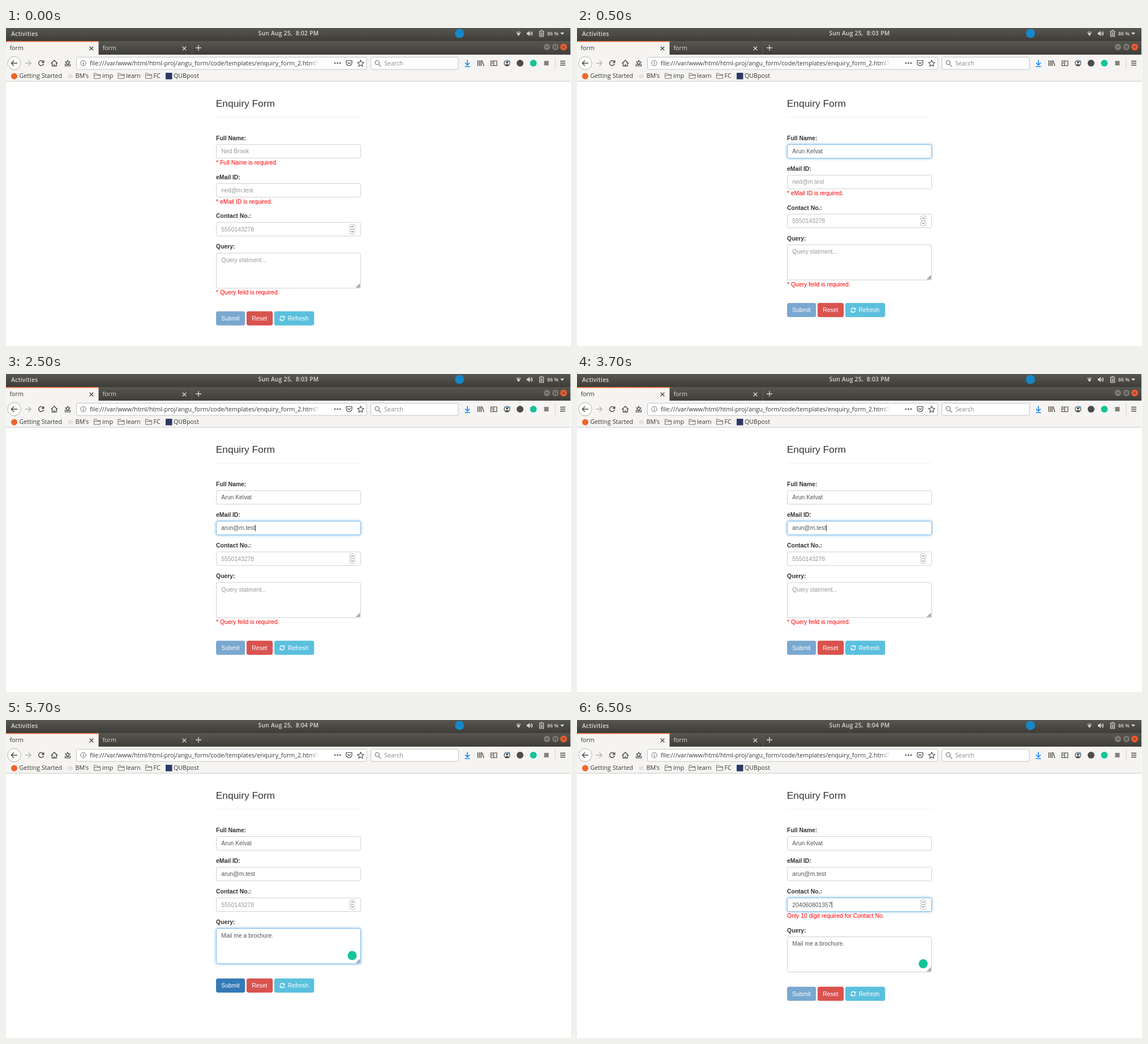
Write an HTML page that moves like this. It is 998 px wide and 561 px high and loops after 8 s.

```html
<!DOCTYPE html>
<html lang="en">
<head>
<meta charset="utf-8">
<title>Enquiry Form</title>
<style>
  html, body { margin: 0; width: 100%; height: 100%; overflow: hidden; background: #fff; }
  svg { display: block; width: 100%; height: 100%; }
  text { white-space: pre; }
  .ui { font: 10.7px "Open Sans", "Noto Sans", sans-serif; fill: #3a3935; }
  .bar { font: 600 10.2px "Open Sans", "Noto Sans", sans-serif; letter-spacing: .3px; fill: #dfdbd2; }
  .line { fill: none; stroke: #4a4945; stroke-width: 1.4; }
  .light { fill: none; stroke: #dfdbd2; stroke-width: 1.3; }
  .box { fill: #fff; stroke: #c6c4c1; }
  #form { font: 10.4px "Liberation Sans", Arial, sans-serif; }
  .label { font-weight: bold; fill: #333; }
  .value { fill: #555; }
  .hint { fill: #999; }
  .error { fill: #f00; }
  .input { fill: #fff; stroke: #c4c4c4; }
  .focus { stroke: #66afe9; filter: drop-shadow(0 0 2.4px rgba(102, 175, 233, .85)); }
  .btn { fill: #fff; }
</style>
</head>
<body>
<svg viewBox="0 0 998 561">
  <defs>
    <linearGradient id="dark" x2="0" y2="1">
      <stop stop-color="#57564f"/><stop offset="1" stop-color="#3d3c38"/>
    </linearGradient>
    <linearGradient id="fade">
      <stop stop-color="#fff" stop-opacity="0"/><stop offset="1" stop-color="#fff"/>
    </linearGradient>
    <path id="folder" d="M.5 9.5V.5H4.5L6 2.5H11.5V9.5ZM.5 4H11.5" fill="none" stroke="#75736f"/>
    <path id="cross" d="M-3.3 -3.3L3.3 3.3M3.3 -3.3L-3.3 3.3"/>
    <g id="arrows">
      <path d="M-3.7 -.9A3.8 3.8 0 0 1 2.9 -2.5" fill="none" stroke="#fff" stroke-width="1.5"/>
      <path d="M4.5 -4.5V-.7H.7Z" fill="#fff"/>
    </g>
  </defs>

  <!-- desktop bar -->
  <rect width="997" height="23.5" fill="url(#dark)"/>
  <text class="bar" x="9" y="13.6">Activities</text>
  <text class="bar" id="clock" x="445.5" y="13.4"></text>
  <circle cx="801" cy="9.5" r="8" fill="#1688c9"/>
  <path d="M900.5 7.5Q905.3 3.6 910 7.5L905.3 14Z" fill="#8b8881"/>
  <path d="M902.5 10Q905.3 7.8 908 10L905.3 14Z" fill="#dfdbd2"/>
  <path d="M920 8H922L925 5V14.5L922 11.5H920Z" fill="#dfdbd2"/>
  <path class="light" d="M926.5 7.5Q928 9.7 926.5 12M928.3 6Q930.7 9.7 928.3 13.5"/>
  <path class="light" d="M942.5 5.5H949.5V15H942.5ZM944.5 4H947.5M944 8.5H948M944 10.5H948M944 12.7H948" style="stroke-width:1.2"/>
  <text class="bar" x="956" y="13" style="font-size:8.8px;letter-spacing:0">86 %</text>
  <path d="M979 8H986L982.5 12Z" fill="#dfdbd2"/>

  <!-- tabs -->
  <rect y="23" width="997" height="25" fill="url(#dark)"/>
  <rect y="23" width="163.5" height="25" fill="#f5f4f2"/>
  <rect y="23" width="163.5" height="1.7" fill="#ee7f4b"/>
  <rect x="328" y="24" width="1" height="23" fill="#5d5b55"/>
  <text class="ui" x="6.5" y="39">form</text>
  <text class="ui" x="170.5" y="39" style="fill:#dfdbd2">form</text>
  <use href="#cross" x="151" y="36" class="line"/>
  <use href="#cross" x="315" y="36" class="light"/>
  <path class="light" d="M335 35H345M340 30V40"/>
  <circle cx="955.5" cy="33.5" r="5.7" fill="#7b7973"/>
  <circle cx="970.5" cy="33.5" r="5.7" fill="#7b7973"/>
  <circle cx="985" cy="33.5" r="6" fill="#ec5b2d"/>
  <path d="M953 33.5H958M968.5 31.7H972.5V35.5H968.5ZM983 31.5L987 35.5M987 31.5L983 35.5" fill="none" stroke="#3c3b37"/>

  <!-- toolbar -->
  <rect y="47" width="997" height="47" fill="#f5f4f2"/>
  <rect y="93.5" width="997" height="1" fill="#cccac7"/>
  <circle cx="14.5" cy="62" r="11.7" class="box" style="stroke:#b3b1ad"/>
  <path class="line" d="M20 62H9.5M14 57.3L9.3 62L14 66.7"/>
  <path class="line" d="M33.5 62H44M39.5 57.3L44.2 62L39.5 66.7" style="stroke:#b7b5b1"/>
  <path class="line" d="M65.5 59A4.4 4.4 0 1 0 66.4 63"/>
  <path d="M67.5 56.5V61.5H62.5Z" fill="#4a4945"/>
  <path class="line" d="M79.5 62.5L85.3 57L91 62.5M81.5 61.5V67H89V61.5M85.3 67V63.5"/>
  <path class="line" d="M104.5 63V66.8H113.5V63M106.5 64.5H111.5M109 57L110.3 59.6L113 60L111 61.8L111.3 63.5H106.7L107 61.8L105 60L107.7 59.6Z" style="stroke-width:1.2"/>
  <rect class="box" x="124.5" y="51.5" width="512.5" height="21.5" rx="2"/>
  <circle cx="136.5" cy="62" r="4.7" class="line" style="stroke:#75736f;stroke-width:1"/>
  <path d="M136.5 61V65M136.5 59V60" stroke="#75736f" stroke-width="1.2"/>
  <text class="ui" x="148" y="66">file:///var/www/html/html-proj/angu_form/code/templates/enquiry_form_2.html?</text>
  <rect x="535" y="54" width="19" height="17" fill="url(#fade)"/>
  <rect x="554" y="54" width="15" height="17" fill="#fff"/>
  <g fill="#5b5955"><circle cx="581" cy="62" r="1.4"/><circle cx="585.5" cy="62" r="1.4"/><circle cx="590" cy="62" r="1.4"/></g>
  <path class="line" d="M601 57.5H611V61.5A5 5 0 0 1 601 61.5ZM603.3 60.5L606 63L608.7 60.5" style="stroke-width:1.2"/>
  <path class="line" d="M626.5 56.7L628.2 60.3L632 60.8L629.2 63.5L629.9 67.4L626.5 65.5L623.1 67.4L623.8 63.5L621 60.8L624.8 60.3Z" style="stroke-width:1.1"/>
  <rect class="box" x="644.5" y="51.5" width="154.5" height="21.5" rx="2"/>
  <path class="line" d="M658.5 64.5L662.5 68M659.3 61A3.6 3.6 0 1 1 652.1 61A3.6 3.6 0 1 1 659.3 61" style="stroke:#85837f"/>
  <text class="ui" x="668" y="66" style="fill:#8a8884">Search</text>
  <path class="line" d="M815 56.5V65M811 61.5L815 65.3L819 61.5M810.5 68H819.5" style="stroke:#0a84ff;stroke-width:1.6"/>
  <path class="line" d="M833.5 57V67M836.5 57V67M839.3 57V67M841 57.5L844 67"/>
  <path class="line" d="M856.5 58H867V66.5H856.5ZM861.5 58V66.5M858 60.5H860M858 62.5H860" style="stroke-width:1.2"/>
  <circle cx="885" cy="62" r="5" class="line" style="stroke-width:1.2"/>
  <circle cx="885" cy="60.5" r="2" fill="#4a4945"/>
  <path d="M881.5 65.5Q885 61.5 888.5 65.5Q885 68 881.5 65.5Z" fill="#4a4945"/>
  <circle cx="888.5" cy="58.5" r="1.8" fill="#3a9be8"/>
  <circle cx="908" cy="62" r="6" fill="#4d4c4a"/>
  <circle cx="931.5" cy="62" r="6" fill="#15c39a"/>
  <rect x="950.5" y="58" width="8" height="8" fill="#85837f"/>
  <rect x="969.5" y="51" width="1" height="22" fill="#d4d2cf"/>
  <path class="line" d="M979 58.5H988M979 62H988M979 65.5H988"/>

  <!-- bookmarks -->
  <circle cx="14.5" cy="85" r="5.5" fill="#f0652a"/>
  <text class="ui" x="23.5" y="88.3">Getting Started</text>
  <ellipse cx="113.5" cy="85" rx="4.5" ry="3.5" fill="#e3e1df"/>
  <text class="ui" x="122.5" y="88.3">BM's</text>
  <use href="#folder" x="155" y="79.5"/>
  <text class="ui" x="170" y="88.3">imp</text>
  <use href="#folder" x="197.5" y="79.5"/>
  <text class="ui" x="212" y="88.3">learn</text>
  <use href="#folder" x="246" y="79.5"/>
  <text class="ui" x="260.5" y="88.3">FC</text>
  <rect x="282" y="79" width="11.5" height="11.5" fill="#2c3a62"/>
  <text class="ui" x="296" y="88.3">QUBpost</text>

  <g id="form"></g>
</svg>
<script>
const LEFT = 371.1, WIDTH = 255.7, EDGE = .8, LOOP = 8000;
const NAME = "Arun Kelvat", MAIL = "arun@m.test", QUERY = "Mail me a brochure.";
const FIELDS = [
  { key: "name", label: "Full Name:", hint: "Ned Brook", error: "* Full Name is required." },
  { key: "mail", label: "eMail ID:", hint: "ned@m.test", error: "* eMail ID is required." },
  { key: "phone", label: "Contact No.:", hint: "5550143278" },
  { key: "query", label: "Query:", hint: "Query statment...", error: "* Query feild is required.", tall: true }
];
const STATES = [
  { start: 0, clock: "8:02" },
  { start: 500, clock: "8:03", name: NAME, focus: "name" },
  { start: 2500, clock: "8:03", name: NAME, mail: MAIL, focus: "mail", caret: true },
  { start: 4500, clock: "8:04", name: NAME, mail: MAIL, query: QUERY, focus: "query", valid: true },
  { start: 6500, clock: "8:04", name: NAME, mail: MAIL, query: QUERY, phone: "204060801357",
    focus: "phone", caret: true, phoneError: "Only 10 digit required for Contact No." }
];
const form = document.getElementById("form"), clock = document.getElementById("clock");

const text = (x, y, cls, str) => `<text x="${x}" y="${y}" class="${cls}">${str}</text>`;
const box = (x, y, w, h, attrs) =>
  `<rect x="${x + EDGE / 2}" y="${y + EDGE / 2}" width="${w - EDGE}" height="${h - EDGE}" rx="2.6" stroke-width="${EDGE}" ${attrs}/>`;
const path = (d, attrs) => `<path d="${d}" ${attrs}/>`;

function spinner(y) {
  const frame = 'fill="#fff" stroke="#aaa"';
  return box(606.7, y + 3.2, 9.8, 9, frame) + box(606.7, y + 12.2, 9.8, 9, frame) +
    path(`M609.6 ${y + 8.7}l2 -2l2 2M609.6 ${y + 15.5}l2 2l2 -2`, 'fill="none" stroke="#333"');
}

function button(x, y, w, label, textX, fill, edge, opacity = 1) {
  return `<g opacity="${opacity}">` + box(x, y, w, 24.8, `fill="${fill}" stroke="${edge}"`) +
    text(textX, y + 16.1, "btn", label) + "</g>";
}

function render(s) {
  clock.textContent = `Sun Aug 25,\u00a0 ${s.clock} PM`;
  let y = 205.3;
  let out = `<text x="${LEFT - .4}" y="139" fill="#333" font-size="17.4">Enquiry Form</text>` +
    `<rect x="${LEFT}" y="157" width="${WIDTH}" height=".8" fill="#eee"/>`;
  for (const f of FIELDS) {
    const value = s[f.key], focused = s.focus === f.key, h = f.tall ? 62.8 : 24.8;
    const error = f.key === "phone" ? s.phoneError : !value && f.error;
    out += text(LEFT, y - 7.3, "label", f.label) +
      box(LEFT, y, WIDTH, h, `class="input ${focused ? "focus" : ""}"`) +
      text(380.3, y + 16.1, value ? "value" : "hint", value || f.hint);
    if (f.key === "phone") out += spinner(y);
    if (f.tall) {
      out += path(`M625.3 ${y + 53.5}V${y + 61.3}H617.3Z`, 'fill="#aaa"');
      if (value) out += `<circle cx="611.5" cy="${y + 48}" r="8" fill="#15c39a"/>`;
    }
    if (focused && s.caret) out += `<rect id="caret" y="${y + 6.5}" width="1" height="11.5" fill="#333"/>`;
    y += h;
    if (error) {
      out += text(LEFT, y + 11, "error", error);
      y += 14.6;
    }
    y += f.tall ? 25.7 : 29.26;
  }
  out += button(LEFT, y, 51.1, "Submit", 380.3, "#337ab7", "#2e6da4", s.valid ? 1 : .65) +
    button(425, y, 46.1, "Reset", 434.2, "#d9534f", "#d43f3a") +
    button(474, y, 70.2, "Refresh", 497.8, "#5bc0de", "#46b8da") +
    `<g transform="translate(487.9 ${y + 12.5})"><use href="#arrows"/><use href="#arrows" transform="rotate(180)"/></g>`;
  form.innerHTML = out;
  const caret = document.getElementById("caret");
  if (caret) caret.setAttribute("x", 380.3 + form.querySelector(".focus + text").getComputedTextLength());
}

let shown;
const began = performance.now();
function tick() {
  const t = (performance.now() - began) % LOOP;
  const state = STATES.findLast(s => s.start <= t);
  if (state !== shown) render(shown = state);
  requestAnimationFrame(tick);
}
tick();
</script>
</body>
</html>
```
